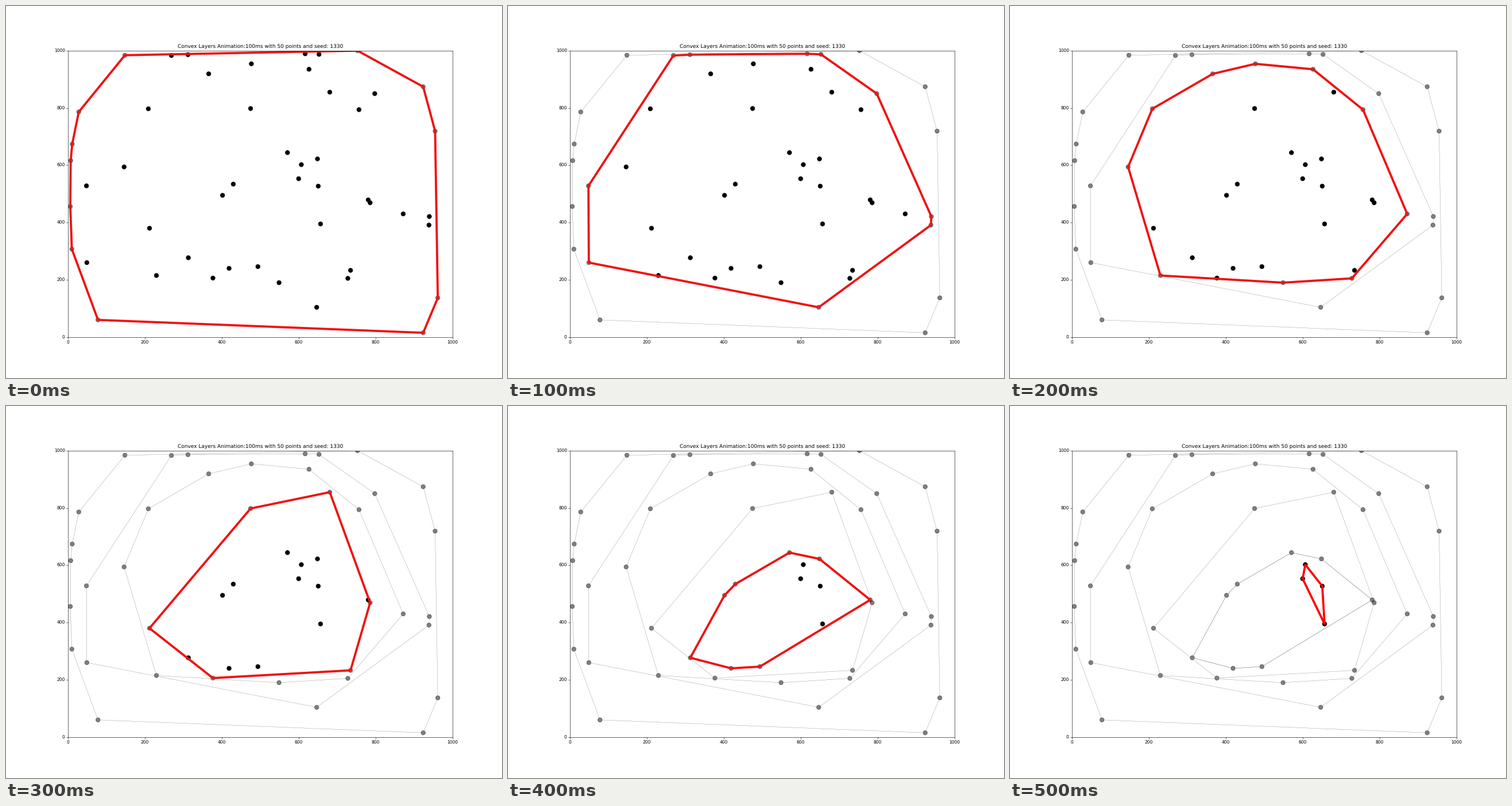
A matplotlib script that plays this animation: 864x648 px, repeating every 0.6 s.

```python
import matplotlib.pyplot as plt
import numpy as np
from matplotlib.animation import FuncAnimation

plt.rcParams["font.family"] = "DejaVu Sans"
plt.rcParams["text.hinting"] = "none"

# The point cloud, sorted by x; hulls, colours and steps all follow from it.
POINTS = [
    (6, 456), (7, 616), (10, 307), (11, 674), (28, 786), (48, 528), (49, 260),
    (78, 60), (146, 594), (148, 984), (209, 797), (212, 380), (230, 215),
    (269, 983), (312, 986), (313, 277), (366, 919), (377, 206), (402, 495),
    (419, 240), (430, 534), (475, 798), (477, 954), (494, 246), (549, 190),
    (571, 644), (600, 553), (607, 602), (617, 989), (627, 935), (647, 104),
    (649, 622), (651, 527), (653, 987), (657, 395), (681, 855), (728, 205),
    (735, 233), (753, 1000), (757, 794), (781, 479), (786, 469), (798, 850),
    (872, 430), (924, 15), (924, 874), (939, 391), (940, 421), (955, 719),
    (962, 137),
]
BLACK, FADED = (0, 0, 0, 1), (0, 0, 0, 0.5)


def half_hull(points):
    """One side of the hull, keeping only counter-clockwise turns."""
    chain = []
    for x, y in points:
        while len(chain) > 1:
            (ax0, ay0), (bx, by) = chain[-2:]
            if (bx - ax0) * (y - ay0) > (by - ay0) * (x - ax0):
                break
            chain.pop()
        chain.append((x, y))
    return chain[:-1]


def convex_layers(points):
    """Peel convex hulls from the outside in, each starting leftmost."""
    rest, layers = sorted(points), []
    while rest:
        hull = half_hull(rest) + half_hull(rest[::-1])
        layers.append(hull)
        rest = [p for p in rest if p not in hull]
    return layers


layers = convex_layers(POINTS)
last = len(layers) - 1
loops = [np.array(hull + hull[:1]).T for hull in layers]
depth = np.repeat(range(len(layers)), [len(hull) for hull in layers])

fig, ax = plt.subplots(figsize=(16, 12), dpi=54)
ax.set(xlim=(0, 1000), ylim=(0, 1000))
ax.set_title("Convex Layers Animation:100ms with 50 points and seed: 1330")
ax.tick_params(axis="x", pad=4.5)

dots = ax.scatter(*np.concatenate(layers).T, s=100, c="k")
active, = ax.plot([], [], "r-", lw=5)
outlines = [ax.plot(*loop, color="gray", lw=0.5)[0] for loop in loops[:-1]]
# The final step traces the innermost peeled hull a second time.
retrace, = ax.plot(*loops[-2], color="gray", lw=0.5)


def update(step):
    dots.set_color([FADED if d <= step and d < last else BLACK for d in depth])
    active.set_data(*loops[step])
    for i, outline in enumerate(outlines):
        outline.set_visible(i <= step)
    retrace.set_visible(step == last)
    return []


anim = FuncAnimation(fig, update, frames=len(layers), interval=100,
                     init_func=lambda: update(0), repeat=True, repeat_delay=0)
plt.show()
```
